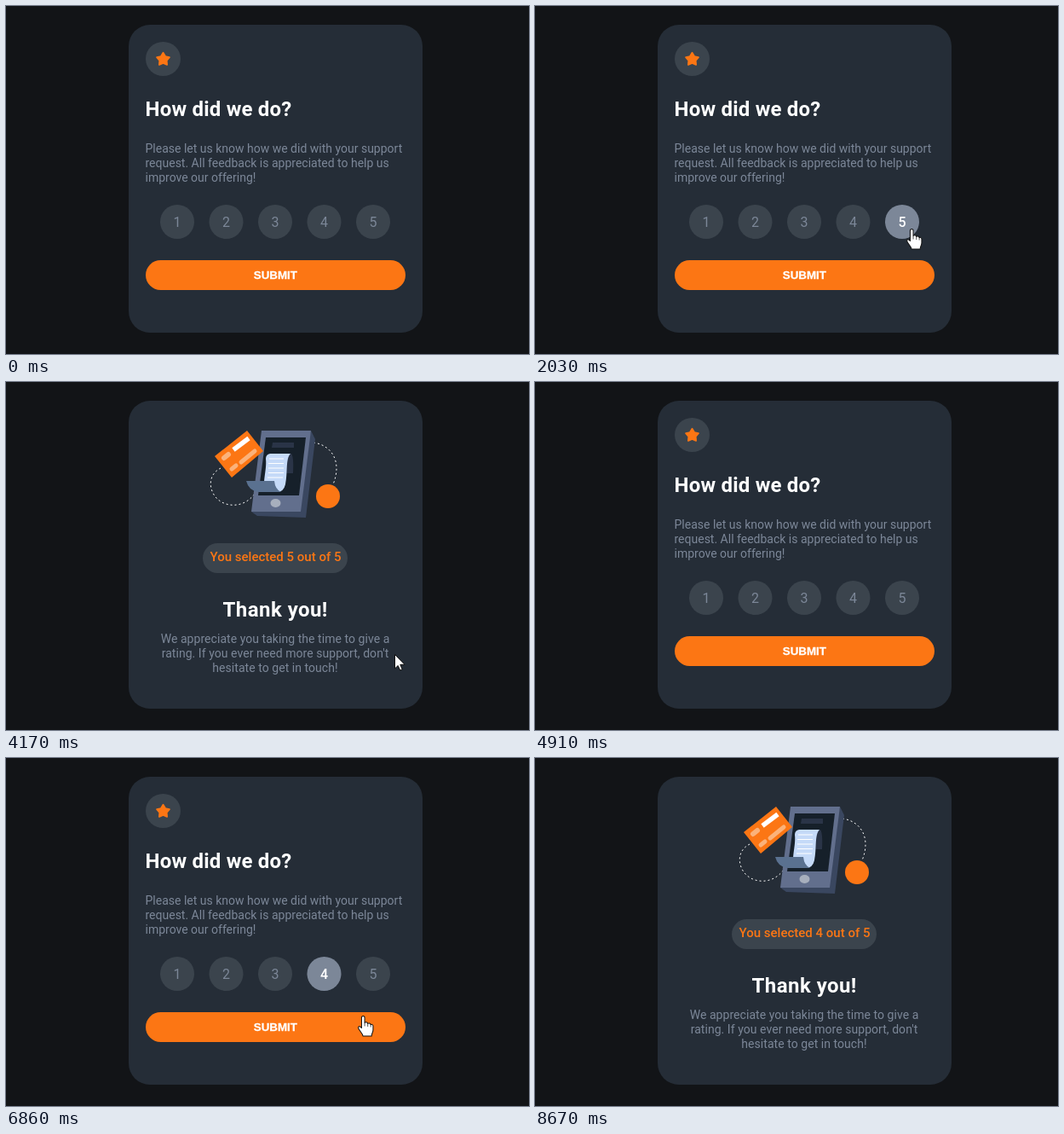
An HTML page for the animation above (9130 ms loop, 614 by 408 pixels).

```html
<!DOCTYPE html>
<html lang="en">
<head>
<meta charset="utf-8">
<title>Rating card</title>
<style>
  html, body { margin: 0; width: 100%; height: 100%; overflow: hidden; background: #121417; }
  svg { display: block; width: 614px; height: 408px; font-family: Roboto, sans-serif; }
  .title { font-size: 24px; font-weight: 700; fill: #fff; }
  .copy { font-size: 14px; fill: #7c8798; }
  .soft { fill: #e8ffff; fill-opacity: .11; }
  .mid { text-anchor: middle; }
  .num { font-size: 16px; text-anchor: middle; }
  .submit { font: 700 13.333px "Liberation Sans", Arial, sans-serif; text-anchor: middle; stroke-width: .3; }
  .orbit { fill: none; stroke: #fff; stroke-dasharray: 2 3; }
  .chip { stroke: #fbb27a; stroke-linecap: round; }
  .pointer { fill: #fff; stroke: #111; stroke-linejoin: round; }
</style>
</head>
<body>
<svg viewBox="0 0 614 408" width="614" height="408">
  <rect width="614" height="408" fill="#121417"/>
  <rect x="144" y="22" width="345" height="361" rx="25" fill="#252d37"/>

  <g id="thanks">
    <path class="orbit" d="M252 101C240 107 237 120 244 132C253 147 278 150 292 131"/>
    <path class="orbit" d="M361 71C382 74 395 93 384 120"/>
    <path fill="#3a4760" d="M358 57L363 67L352 159L295 157L288 152L340 140Z"/>
    <path fill="#626f8d" d="M300 57H358L346 152H288Z"/>
    <path fill="#16202a" d="M305 65H352L344 133H296Z"/>
    <path fill="#2a3447" d="M313 71H338V77H312ZM328 84H335Q338 88 337 107H328Z"/>
    <ellipse cx="316.5" cy="142" rx="6" ry="5" fill="#a7afbd"/>
    <path fill="#c5daf8" d="M310 84H334C328 90 331 106 328 120Q326 129 318 129H310L303 117C304 106 306 98 305 90Q305 85 310 84Z"/>
    <path stroke="#fff" fill="none" d="M309 90H326M308 95.500H326M308 101H326M308 106.500H326M307 112H325"/>
    <path fill="#5a7190" d="M282 116H315Q316 126 323 129H297Q285 128 282 116Z"/>
    <path fill="#fc7614" d="M245 87L283 57L302 81L265 112Z"/>
    <path stroke="#fff" stroke-width="5.500" d="M267 79.500L285 66"/>
    <path class="chip" stroke-width="6" d="M256 89L261 85"/>
    <path class="chip" stroke-width="5" d="M265 102L270 98M276 94L292 81"/>
    <circle cx="378" cy="134" r="14" fill="#fc7614"/>

    <rect class="soft" x="231" y="189" width="170" height="35" rx="17.500"/>
    <text id="result" class="mid" x="316.500" y="210" font-size="15" font-weight="500" fill="#fc7614"></text>
    <text class="title mid" x="316.200" y="275" letter-spacing=".45">Thank you!</text>
    <g class="copy mid" letter-spacing=".05">
      <text x="316" y="306">We appreciate you taking the time to give a</text>
      <text x="316" y="323">rating. If you ever need more support, don't</text>
      <text x="316" y="340">hesitate to get in touch!</text>
    </g>
  </g>

  <g id="question">
    <ellipse class="soft" cx="184.500" cy="62" rx="20.500" ry="20"/>
    <polygon id="star" fill="#fc7614" stroke="#fc7614" stroke-width="1.800" stroke-linejoin="round"/>
    <text class="title" x="163.500" y="129" letter-spacing=".2">How did we do?</text>
    <g class="copy">
      <text x="163.500" y="172">Please let us know how we did with your support</text>
      <text x="163.500" y="189">request. All feedback is appreciated to help us</text>
      <text x="163.500" y="206">improve our offering!</text>
    </g>
    <g id="scores"></g>
    <rect id="button" x="164" y="298" width="305" height="35" rx="17.500"/>
    <text id="label" class="submit" x="316.300" y="320">SUBMIT</text>
  </g>

  <circle id="press" r="12" fill="#ffcd0a" fill-opacity=".65"/>
  <g id="cursor" class="pointer">
    <path id="arrow" d="M.5 .5V17L4.200 13.500L6.700 19L9.200 18L6.800 12.300H12Z"/>
    <g id="hand" transform="translate(1 0) scale(1.040)">
      <path d="M-1.500 2.500C-1.500 -.2 2 -.2 2 2.500V8C3 7 5.300 7.300 5.500 9C6.800 8.200 8.500 8.600 8.800 10.200C10.200 9.500 11.500 10.200 11.500 12V16C11.500 19 9.800 20 9.800 23H0C-.5 20 -3.300 18 -5 14.500C-5.600 12 -3.500 11.300 -1.500 14Z"/>
      <path fill="none" stroke-width=".7" d="M2 8V12M5.500 9V12.500M8.800 10.200V13"/>
    </g>
  </g>
</svg>
<script>
const LOOP = 9130;
const ORANGE = '#fc7614', GREY = '#7c8798', BLEND = '#bc7f56';
const $ = id => document.getElementById(id);
const set = (el, attrs) => { for (const k in attrs) el.setAttribute(k, attrs[k]); };
const show = (el, on) => set(el, { display: on ? 'inline' : 'none' });
const make = (tag, attrs, parent) => {
  const el = document.createElementNS('http://www.w3.org/2000/svg', tag);
  set(el, attrs);
  return parent.appendChild(el);
};
const within = (t, a, b) => t >= a && t < b;
const smooth = p => p * p * (3 - 2 * p);
const easeOut = p => 1 - (1 - p) ** 2;

set($('star'), {
  points: Array.from({ length: 10 }, (_, i) => {
    const r = i % 2 ? 4.4 : 7.8, a = i * Math.PI / 5;
    return (184.5 + r * Math.sin(a)).toFixed(2) + ',' + (62.6 - r * Math.cos(a)).toFixed(2);
  }).join(' ')
});

const scores = [1, 2, 3, 4, 5].map(n => {
  const x = 143.5 + 57.5 * n;
  const disc = make('circle', { cx: x, cy: 253, r: 20 }, $('scores'));
  const digit = make('text', { class: 'num', x, y: 258.5 }, $('scores'));
  digit.textContent = n;
  return { x, disc, digit };
});

// The pointer was sampled in steps; each move holds its last position.
const moves = [
  { start: 330, end: 1160, n: 13, from: [503, 394], to: [443, 266], enter: true },
  { start: 1290, end: 1360, n: 2, from: [443, 266], to: [441, 261] },
  { start: 2230, end: 2510, n: 5, from: [441, 261], to: [422, 323] },
  { start: 4170, end: 4170, n: 1, from: [422, 323], to: [456, 319], leave: 4240 },
  { start: 5310, end: 6000, n: 11, from: [596, 295], to: [385, 249], enter: true },
  { start: 6590, end: 6860, n: 5, from: [385, 249], to: [418, 302] },
  { start: 8310, end: 8670, n: 6, from: [418, 302], to: [465, 420], leave: 8670 }
];

const clickable = (x, y) =>
  (within(x, 164, 469) && within(y, 298, 333)) ||
  scores.some(s => Math.hypot(x - s.x, y - 253) <= 20);

function pointer(t) {
  const m = moves.filter(m => t >= m.start).pop();
  if (!m || t >= m.leave) return null;
  const gap = (m.end - m.start) / (m.n - 1) || 1;
  const i = Math.min(m.n - 1, Math.floor((t - m.start) / gap + .02));
  const p = m.enter ? easeOut(i / (m.n - 1)) : smooth((i + 1) / m.n);
  const [x, y] = m.from.map((v, k) => Math.round(v + (m.to[k] - v) * p));
  return { x, y, hand: !m.leave && clickable(x, y) };
}

function scoreColor(n, t) {
  if (n === 5 && within(t, 1430, 4910)) return t < 2030 ? ORANGE : GREY;
  if (n === 4 && t >= 6200) return t < 6330 ? ORANGE : t < 6390 ? BLEND : GREY;
  return null;
}

function draw(t) {
  const asking = t < 3310 || within(t, 4910, 7650);
  show($('question'), asking);
  set($('question'), { opacity: t >= 7590 ? .66 : 1 });
  show($('thanks'), within(t, 3240, 4910) || t >= 7590);
  $('result').textContent = `You selected ${t < 4910 ? 5 : 4} out of 5`;

  scores.forEach((s, i) => {
    const color = scoreColor(i + 1, t);
    set(s.disc, { fill: color || '#e8ffff', 'fill-opacity': color ? 1 : .11 });
    set(s.digit, { fill: color ? '#fff' : GREY, 'font-weight': color ? 500 : 400 });
  });

  const sending = within(t, 2910, 3240) || within(t, 7390, 7590);
  const ink = sending ? ORANGE : '#fff';
  set($('button'), { fill: sending ? '#fff' : ORANGE });
  set($('label'), { fill: ink, stroke: ink });

  const c = pointer(t);
  show($('cursor'), c);
  show($('press'), c && (sending || within(t, 1430, 2030) || within(t, 6200, 6330)));
  if (!c) return;
  set($('cursor'), { transform: `translate(${c.x} ${c.y})` });
  set($('press'), { cx: c.x, cy: c.y });
  show($('hand'), c.hand);
  show($('arrow'), !c.hand);
}

const begin = performance.now();
function tick() {
  draw((performance.now() - begin) % LOOP);
  requestAnimationFrame(tick);
}
tick();
</script>
</body>
</html>
```
